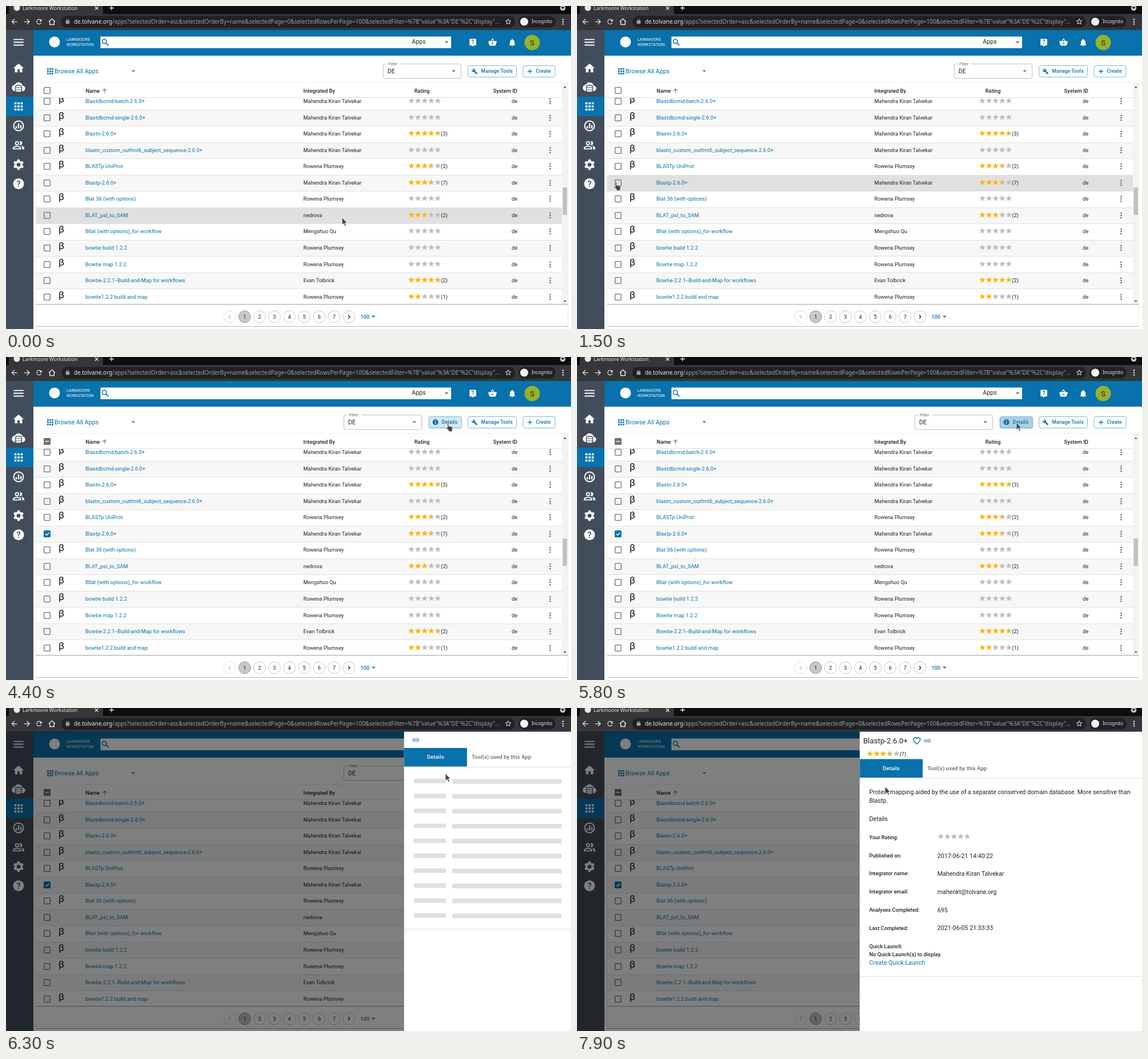
An HTML page that plays this animation: 990x566 px, repeating every 8000 ms.

```html
<!DOCTYPE html>
<html lang="en">
<head>
<meta charset="utf-8">
<title>App list</title>
<style>
html, body { margin: 0; width: 100%; height: 100%; overflow: hidden; background: #fff; }
svg { display: block; width: 990px; height: 566px; font-family: Roboto, sans-serif; }
.ui { font-family: "Noto Sans", sans-serif; }
.b { font-weight: 500; }
.wide { letter-spacing: .15px; }
.mid { text-anchor: middle; }
</style>
</head>
<body>
<svg id="stage" viewBox="0 0 990 566"></svg>
<script>
const BLUE = '#0971ab', INK = '#222', GREY = '#707070', LINE = '#e0e0e0', SLATE = '#424d5b';
const ROW_H = 28.53, ROW_TOP = 153, PICKED = 5;

// name, beta, integrator, stars, votes
const M = 'Mahendra Kiran Talvekar', R = 'Rowena Plumsey';
const apps = [
  ['Blastdbcmd-batch-2.6.0+', 1, M, 0],
  ['Blastdbcmd-single-2.6.0+', 1, M, 0],
  ['Blastn-2.6.0+', 1, M, 4.5, 3],
  ['blastn_custom_outfmt6_subject_sequence-2.6.0+', 1, M, 0],
  ['BLASTp UniProt', 1, R, 3.5, 2],
  ['Blastp-2.6.0+', 0, M, 3.5, 7],
  ['Blat 36 (with options)', 1, R, 0],
  ['BLAT_psl_to_SAM', 0, 'nedrova', 3, 2],
  ['Bllat (with options)_for workflow', 1, 'Mengshuo Qu', 0],
  ['bowtie build 1.2.2', 1, R, 0],
  ['Bowtie map 1.2.2', 1, R, 0],
  ['Bowtie-2.2.1--Build-and-Map for workflows', 0, 'Evan Tolbrick', 4.5, 2],
  ['bowtie1.2.2 build and map', 1, R, 2, 1]
];

// closed outline through [angle in degrees from the top, radius] points
const polar = (x, y, points) => 'M' + points.map(([deg, r]) => {
  const a = deg * Math.PI / 180;
  return `${(x + r * Math.sin(a)).toFixed(2)} ${(y - r * Math.cos(a)).toFixed(2)}`;
}).join('L') + 'z';
const star = (x, y, r = 5.6) => polar(x, y, [...Array(10).keys()].map(i => [i * 36, i % 2 ? r * .43 : r]));
const teeth = [0, 60, 120, 180, 240, 300].flatMap(a => [[a - 12, 10], [a + 12, 10], [a + 19, 7.6], [a + 41, 7.6]]);

// icons on a 24 unit grid
const icons = {
  menu: 'M3 6h18v2H3zm0 5h18v2H3zm0 5h18v2H3z',
  home: 'M10 20v-6h4v6h5v-8h3L12 3 2 12h3v8z',
  cloud: 'M19.4 10A7.5 7.5 0 0 0 5.4 8 6 6 0 0 0 6 20h13a5 5 0 0 0 .4-10z',
  gear: polar(12, 12, teeth) + 'M12 15.6a3.6 3.6 0 1 1 0-7.2 3.6 3.6 0 0 1 0 7.2z',
  grid: [4, 10, 16].map(y => [4, 10, 16].map(x => `M${x} ${y}h4v4h-4z`).join('')).join(''),
  bell: 'M12 22a2 2 0 0 0 2-2h-4a2 2 0 0 0 2 2zm6-6v-5c0-3.1-1.6-5.6-4.5-6.3V4a1.5 1.5 0 0 0-3 0v.7C7.6 5.4 6 7.9 6 11v5l-2 2v1h16v-1z',
  basket: 'M17.2 9l-4.4-6.6a1 1 0 0 0-1.6 0L6.8 9H2a1 1 0 0 0-1 1.3l2.5 9.3A2 2 0 0 0 5.5 21h13a2 2 0 0 0 1.9-1.4L23 10.3A1 1 0 0 0 22 9zM9 9l3-4.4L15 9zm3 8a2 2 0 1 1 0-4 2 2 0 0 1 0 4z',
  bubble: 'M19 2H5a2 2 0 0 0-2 2v14a2 2 0 0 0 2 2h4l3 3 3-3h4a2 2 0 0 0 2-2V4a2 2 0 0 0-2-2z',
  wrench: 'M22.7 19l-9.1-9.1c.9-2.3.4-5-1.5-6.9-2-2-5-2.4-7.4-1.3L9 6 6 9 1.6 4.7C.4 7.1.9 10.1 2.9 12.1c1.9 1.9 4.6 2.4 6.9 1.5l9.1 9.1c.4.4 1 .4 1.4 0l2.3-2.3c.5-.4.5-1.1.1-1.4z',
  heart: 'M12 20.5C6 15.3 3 12.3 3 8.5A4.7 4.7 0 0 1 12 6.3 4.7 4.7 0 0 1 21 8.500c0 3.8-3 6.8-9 12z',
  link: 'M3.9 12A3.1 3.1 0 0 1 7 8.9h4V7H7a5 5 0 0 0 0 10h4v-1.9H7A3.1 3.1 0 0 1 3.9 12zM8 13h8v-2H8zm9-6h-4v1.9h4a3.1 3.1 0 0 1 0 6.2h-4V17h4a5 5 0 0 0 0-10z',
  back: 'M20 11H7.8l5.6-5.6L12 4l-8 8 8 8 1.4-1.4L7.8 13H20z',
  forward: 'M4 11h12.2l-5.6-5.6L12 4l8 8-8 8-1.4-1.4 5.6-5.6H4z',
  up: 'M11 20V7.8l-5.6 5.6L4 12l8-8 8 8-1.4 1.4L13 7.8V20z',
  reload: 'M17.65 6.35A8 8 0 1 0 19.73 14h-2.08A6 6 0 1 1 12 6c1.66 0 3.14.69 4.22 1.78L13 11h7V4z',
  lock: 'M18 8h-1V6A5 5 0 0 0 7 6v2H6a2 2 0 0 0-2 2v10c0 1.1.9 2 2 2h12a2 2 0 0 0 2-2V10a2 2 0 0 0-2-2zM9 6a3 3 0 0 1 6 0v2H9z',
  people: 'M9 12a4 4 0 1 0 0-8 4 4 0 0 0 0 8zm0-2a2 2 0 1 1 0-4 2 2 0 0 1 0 4zm6 2a4 4 0 0 0 0-8q-.7 0-1.3.2a6 6 0 0 1 0 7.6q.6.2 1.3.2zM9 13c-3 0-8 1.5-8 4.5V20h16v-2.5c0-3-5-4.5-8-4.5zm-6 5c.2-1.3 3.3-3 6-3s5.800 1.7 6 3zm13.7-4.9c1.4 1 2.3 2.4 2.3 4.4V20h4v-2.500c0-2.6-3.5-4-6.3-4.4z'
};

const rect = (x, y, w, h, fill, more = '') => `<rect x="${x}" y="${y}" width="${w}" height="${h}" fill="${fill}" ${more}/>`;
const circle = (x, y, r, fill, more = '') => `<circle cx="${x}" cy="${y}" r="${r}" fill="${fill}" ${more}/>`;
const text = (x, y, s, size = 9.3, fill = INK, cls = '') =>
  `<text x="${x}" y="${y}" font-size="${size}" fill="${fill}" class="${cls}">${s}</text>`;
const bold = (x, y, s, size = 9.33, fill = INK, cls = '') => text(x, y, s, size, fill, 'b ' + cls);
const path = (d, fill, more = '') => `<path d="${d}" fill="${fill}" ${more}/>`;
const stroke = (d, color, w = 1.4, more = '') => path(d, 'none', `stroke="${color}" stroke-width="${w}" ${more}`);
const place = (x, y, size) => `transform="translate(${x - size / 2} ${y - size / 2}) scale(${size / 24})"`;
const icon = (name, x, y, size, fill) => path(icons[name], fill, `fill-rule="evenodd" ${place(x, y, size)}`);
const caret = (x, y, fill = GREY) => path(`M${x - 3.4} ${y - 1.6}h6.8l-3.4 3.4z`, fill);
const hline = (x, y, w, color = LINE) => rect(x, y, w, 1, color);
const group = (id, body) => `<g id="${id}">${body}</g>`;
const dots = (x, y, fill) => [-4, 0, 4].map(d => circle(x, y + d, 1.3, fill)).join('');

function rating(x, y, value, votes) {
  let out = '';
  for (let i = 0; i < 5; i++) {
    const left = value - i;
    const fill = left >= 1 ? '#ffb400' : left > 0 ? 'url(#half)' : '#bdbdbd';
    out += path(star(x + i * 11.6, y), fill);
  }
  return out + (votes ? text(x + 51.8, y + 3.3, `(${votes})`) : '');
}
const box = (x, y) => rect(x - 5.3, y - 5.3, 10.6, 10.6, 'none', `rx="1" stroke="${GREY}" stroke-width="1.3"`);
const fullBox = (x, y, fill, mark) => rect(x - 6, y - 6, 12, 12, fill, 'rx="1.4"') + stroke(mark, '#fff');
const button = (x, w, label, tx) =>
  rect(x + .5, 104.5, w, 20, 'none', `rx="3" stroke="${BLUE}" stroke-opacity=".5"`) + bold(tx, 117.4, label, 8.55, BLUE, 'wide');

function browser() {
  const pale = '#e8eaed', dim = '#9aa0a6';
  return rect(0, 0, 990, 41.5, '#0d0e10') + rect(5, -8, 165, 30, '#35363a', 'rx="6"') + rect(0, 14, 990, 27.5, '#35363a') +
    circle(19, 3, 5.5, pale) + text(29, 7.3, 'Larkmoore Workstation', 8.7, pale, 'ui') +
    stroke('M156 1l5.5 5.5m0-5.5l-5.5 5.5M181 3.5h8m-4-4v8', pale, 1.3) +
    circle(975.5, 3.5, 4.8, '#c4c7cb') + caret(975.5, 3.3, '#0d0e10') +
    icon('back', 14.5, 27.5, 15, pale) + icon('forward', 37, 27.5, 15, pale) + icon('reload', 58, 27.5, 14, pale) +
    stroke('M75 27.5l5.5-5 5.5 5M76.7 26.5v6h7.6v-6', pale) +
    rect(97, 17.5, 795, 20.5, '#202124', 'rx="10"') + icon('lock', 108, 27, 10, dim) +
    text(119, 31, '<tspan fill="#e8eaed">de.tolvane.org</tspan>/apps?selectedOrder=asc&amp;selectedOrderBy=name&amp;selectedPage=0&amp;selectedRowsPerPage=100&amp;selectedFilter=%7B"value"%3A"DE"%2C"display"…', 9.86, dim, 'ui') +
    stroke(star(880, 27.5, 5), pale, 1) +
    rect(898, 17.5, 65, 20, '#202124', 'rx="10"') + circle(908, 27.5, 7, '#f1f3f4') +
    text(921, 30.4, 'Incognito', 8, pale, 'ui') + dots(976, 27.5, pale);
}

function sidebar() {
  const disks = rect(16.5, 139, 11, 12, '#fff', `rx="3" stroke="${SLATE}" stroke-width="1.3"`) +
    stroke('M17 143h10m-10 4h10', SLATE, 1.2);
  return rect(0, 41, 48, 525, SLATE) + rect(0, 159, 48, 34, BLUE) +
    icon('menu', 22, 63.5, 23.5, '#fff') + icon('home', 22, 109, 22, '#fff') +
    icon('cloud', 22, 141.5, 23, '#fff') + disks + icon('grid', 22, 176, 22, '#fff') +
    circle(22, 210, 8.5, 'none', 'stroke="#fff" stroke-width="2"') +
    stroke('M18 214.5v-4m4 4v-9m4 9v-6', '#fff', 2.3) + icon('people', 22, 244, 22, '#fff') +
    icon('gear', 22, 278, 22.5, '#fff') +
    circle(22, 311.5, 9.5, '#fff') + bold(22, 317, '?', 15, SLATE, 'mid');
}

function appBar() {
  return rect(47.5, 41, 943, 46, BLUE) + circle(85, 63, 9.5, '#fff') +
    text(106, 61, 'LARKMOORE', 7, '#fff') + text(106, 70, 'WORKSTATION', 7, '#fff') +
    rect(165.5, 53.5, 614.5, 20.5, '#fff') + circle(172.3, 62, 3.7, 'none', `stroke="${BLUE}" stroke-width="1.5"`) +
    stroke('M175 64.7l4.5 4.5', BLUE, 1.8) + text(711, 66, 'Apps', 10.67) + caret(772, 63.7) +
    icon('bubble', 818, 64, 15.5, '#fff') + bold(818, 67.3, '?', 10, BLUE, 'mid') +
    icon('basket', 852.5, 63.5, 16, '#fff') + icon('bell', 887, 64, 16, '#fff') +
    circle(922, 64, 13.5, '#97b12a') + text(922, 68.6, 'S', 13, INK, 'mid');
}

function toolbar() {
  const filter = rect(661, 101.5, 136.5, 25.5, 'none', 'rx="3" stroke="#bcbcbc"') + rect(667, 99, 24, 5, '#fff') +
    text(670, 103.6, 'Filter', 7.2, '#666') + text(668.5, 118, 'DE', 10.67) + caret(784.5, 114);
  const details = rect(741, 105, 57, 20, BLUE, 'id="glow" rx="3" opacity="0"') +
    circle(772, 116, 0, BLUE, 'id="press" opacity=".2" clip-path="url(#pressClip)"') +
    button(740.5, 57.5, 'Details', 763.5) + circle(752.5, 114.3, 5, BLUE) +
    rect(751.9, 113.6, 1.2, 3.4, '#fff') + rect(751.9, 111.5, 1.2, 1.2, '#fff');
  return icon('grid', 77.5, 114.3, 16, BLUE) + text(85, 118, 'Browse All Apps', 10.67, BLUE) + caret(223, 114) +
    group('filter', filter) + group('details', details) +
    button(809, 85, 'Manage Tools', 832.5) + icon('wrench', 821, 114.5, 11, BLUE) +
    button(905.5, 56, 'Create', 928.5) + stroke('M914 114.5h8m-4-4v8', BLUE, 1.3);
}

const rowTop = i => Math.round(ROW_TOP + i * ROW_H);
const rowMid = i => Math.round(ROW_TOP + 14.2 + i * ROW_H);

function row([name, beta, who, stars, votes], i) {
  const top = rowTop(i), y = rowMid(i);
  return rect(53, top, 921, ROW_H + 1, '#fff', `id="row${i}"`) + hline(53, top, 921) +
    box(72, y) + (beta ? text(92, y + 2, 'β', 17, '#111') : '') +
    text(139, y + 3.2, name, 9.3, BLUE) + text(521, y + 3.2, who) +
    rating(710.3, y - .8, stars, votes) + text(886, y + 3.2, 'de') + dots(953.5, y, '#606060');
}

function table() {
  const y = rowMid(PICKED);
  const check = fullBox(72, y, BLUE, `M69 ${y}l2.2 2.3 4.2-4.5`) + circle(72, y, 0, BLUE, 'id="ripple"');
  const some = fullBox(72, 148, GREY, 'M68.5 148h7');
  const pages = [1, 2, 3, 4, 5, 6, 7].map(n => {
    const x = 392 + n * 26.13;
    return circle(x, 544.5, 10.5, n > 1 ? '#fff' : '#c8c8c8', `stroke="${n > 1 ? '#c8c8c8' : '#999'}"`) +
      text(x, 547.9, n, 9.33, INK, 'mid');
  }).join('');
  return rect(52.5, 134, 932, 428, 'none', 'stroke="#eee"') +
    `<g clip-path="url(#rowsClip)">${apps.map(row).join('')}${group('check', check)}</g>` +
    box(72, 148) + group('some', some) + bold(139.5, 151.5, 'Name') + icon('up', 172.5, 148.5, 12, GREY) +
    bold(521, 151.5, 'Integrated By') + bold(715.5, 151.5, 'Rating') + bold(853.6, 151.5, 'System ID') +
    hline(53, 160, 921) + rect(974, 135, 10.5, 387, '#f3f3f3') + rect(975.5, 318, 7.5, 48, '#c1c1c1') +
    path('M976.5 143.5h5.5l-2.7-3z', '#555') + path('M976.5 516h5.5l-2.7 3z', '#555') +
    hline(53, 522, 932, '#b5b5b5') + hline(53, 523, 932, '#e2e2e2') +
    circle(392, 544.5, 10.5, '#fff', 'stroke="#e2e2e2"') + stroke('M393.5 541.5l-3 3 3 3', '#bbb', 1.2) + pages +
    circle(601, 544.5, 10.5, '#fff', 'stroke="#c8c8c8"') + stroke('M599.5 541.5l3 3-3 3', INK) +
    bold(621, 547.7, '100', 9.33, BLUE) + caret(644, 544.3, BLUE) + hline(53, 561, 932, '#bcbcbc');
}

const NARROW = 697.5, WIDE = 495.4;
const tabs = (x, y) => rect(x, y, 110.3, 32.5, BLUE) + bold(x + 55.2, y + 19.3, 'Details', 9.33, '#fff', 'mid wide') +
  bold(x + 118.6, y + 19.3, 'Tool(s) used by this App', 9.33, '#666', 'wide') + hline(x, y + 33, 990 - x);
const panel = x => rect(x, 41.5, 990 - x, 525, '#fff');
const header = x => panel(x) + text(x + 6, 62.3, 'Blastp-2.6.0+', 13.33) +
  path(icons.heart, 'none', `stroke="${BLUE}" stroke-width="2" ${place(x + 100, 57.5, 16)}`) +
  icon('link', x + 118.5, 57.5, 13, BLUE) + rating(x + 18, 80.3, 3.5, 7) + tabs(x, 89.5);

function skeleton() {
  let bars = '';
  for (let i = 0; i < 10; i++) {
    const y = 124 + i * 26.18;
    bars += rect(714.5, y, 56.5, 8, LINE, 'rx="2"') + rect(782, y + .4, 191.5, 8.3, LINE, 'rx="2"');
  }
  return panel(NARROW) + icon('link', 718, 56, 13, BLUE) + tabs(NARROW, 70) + bars + hline(NARROW, 387, 293);
}

function fullPanel() {
  const fields = [['Your Rating:', ''], ['Published on:', '2017-06-21 14:40:22'], ['Integrator name:', M],
    ['Integrator email:', 'mahenkt@tolvane.org'], ['Analyses Completed:', '695'], ['Last Completed:', '2021-06-05 21:33:33']];
  return header(WIDE) +
    text(512, 150.8, 'Protein mapping aided by the use of a separate conserved domain database. More sensitive than', 10.67) +
    text(512, 166, 'Blastp.', 10.67) + text(512, 198, 'Details', 10.67) + rating(637.5, 225.3, 0) +
    fields.map(([label, value], i) => {
      const y = 230.4 + i * 31.7;
      return bold(512, y - .4, label) + text(631.5, y + .4, value, 10.67);
    }).join('') +
    bold(512, 421, 'Quick Launch') + bold(512, 434.7, 'No Quick Launch(s) to display.') +
    text(512, 450, 'Create Quick Launch', 10.67, BLUE) + hline(WIDE, 470, 495);
}

const outline = 'stroke="#fff" stroke-width=".6"';
const cursor = path('M0 0V12.5L3 9.8 5 14.7 7 13.8 5 9H8.7z', '#444', `id="arrow" ${outline}`) +
  path('M3.5 1.3q1.5-1.2 2 .4V6l5.5 1.2q1.6.5 1.4 2L11.7 13v2.5H5.7v-1.8L1.5 9.6Q1.2 7.9 2.9 8.3L3.7 9z', '#444', `id="hand" ${outline}`);

document.getElementById('stage').innerHTML =
  `<defs><linearGradient id="half"><stop offset=".5" stop-color="#ffb400"/><stop offset=".5" stop-color="#bdbdbd"/></linearGradient>
   <clipPath id="rowsClip">${rect(53, 160.5, 921, 361.5, '#000')}</clipPath>
   <clipPath id="pressClip">${rect(741, 105, 57, 20, '#000', 'rx="3"')}</clipPath></defs>` +
  rect(0, 0, 990, 566, '#fff') + appBar() + sidebar() + toolbar() + table() + browser() +
  rect(0, 41.5, 990, 525, '#000', 'id="shade"') +
  group('skeleton', skeleton()) + group('loaded', header(NARROW) + hline(NARROW, 155, 293)) + group('full', fullPanel()) +
  group('cursor', cursor);

const el = id => document.getElementById(id);
const show = (id, on) => el(id).setAttribute('display', on ? 'inline' : 'none');
const set = (id, name, value) => el(id).setAttribute(name, value);
const span = (t, a, b) => Math.min(1, Math.max(0, (t - a) / (b - a)));
const smooth = u => u * u * (3 - 2 * u);

const stops = [[589, 371], [64, 308], [770, 115], [540, 138]];
function pointer(t) {
  const moves = [smooth(1 - (1 - span(t, 500, 1400)) ** 1.8), smooth(span(t, 3500, 4400)), smooth(span(t, 7500, 7900))];
  return [0, 1].map(k => moves.reduce((v, p, i) => v + p * (stops[i + 1][k] - stops[i][k]), stops[0][k]));
}

function draw(t) {
  const [x, y] = pointer(t), picked = t >= 1900;
  const hover = t < 3600 ? Math.floor((y - ROW_TOP) / ROW_H) : -1;
  apps.forEach((_, i) => set('row' + i, 'fill',
    i === hover ? (picked ? '#e6f5f9' : '#e0e0e0') : i % 2 ? '#f7f7f7' : '#fff'));

  ['check', 'some', 'details'].forEach(id => show(id, picked));
  set('filter', 'transform', `translate(${picked ? -69 : 0} 0)`);
  set('ripple', 'r', 14 * span(t, 1800, 2100));
  set('ripple', 'opacity', .25 * (1 - span(t, 2100, 2400)));

  const onButton = t >= 3600 && x > 740 && y < 126;
  set('glow', 'opacity', onButton ? .17 : 0);
  set('press', 'r', 40 * span(t, 5300, 5600));

  set('shade', 'opacity', t < 6000 ? 0 : t < 6300 ? .36 : .5);
  show('skeleton', t >= 6000 && t < 6500);
  show('loaded', t >= 6500 && t < 6900);
  show('full', t >= 6900);

  const hand = t >= 1500 && t < 3600 || onButton && t < 5800;
  show('hand', hand);
  show('arrow', !hand);
  set('cursor', 'transform', `translate(${x} ${y})`);
}

const start = performance.now();
function tick() {
  draw(Math.floor((performance.now() - start) % 8000 / 100) * 100);
  requestAnimationFrame(tick);
}
tick();
</script>
</body>
</html>
```
